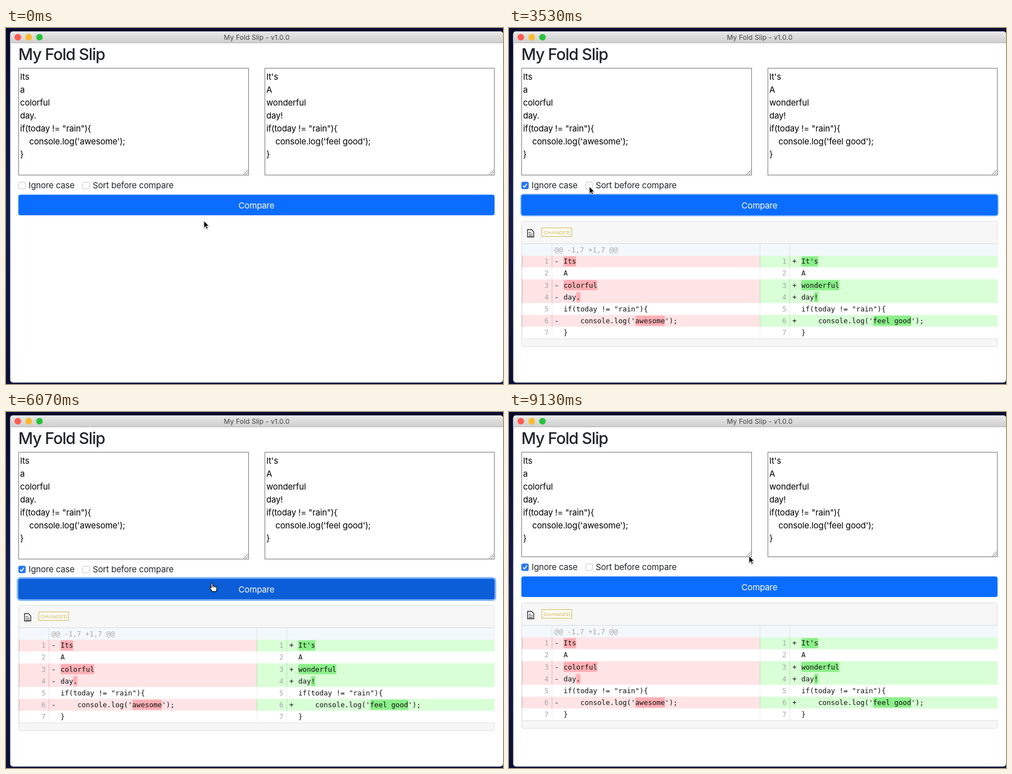
Recreate the animation shown at these times as an HTML page. Size 884 by 633 pixels, loop 9330 ms.

```html
<!DOCTYPE html>
<html lang="en">
<head>
<meta charset="utf-8">
<title>My Fold Slip</title>
<style>
  html, body { margin: 0; width: 100%; height: 100%; overflow: hidden; background: #0b1038; }
  svg { display: block; }
  text { font: 15px Inter, sans-serif; letter-spacing: -.01em; white-space: pre; fill: #212529; }
  .heading { font-size: 28.5px; font-weight: 500; letter-spacing: -.035em; }
  .caption { font-size: 12px; letter-spacing: .01em; fill: #444; text-anchor: middle; }
  .input { fill: #000; }
  .action { fill: #fff; text-anchor: middle; }
  .badge { font: 9.6px "Liberation Sans", sans-serif; letter-spacing: 0; fill: #d0b44c; }
  .code { font: 12.48px "DejaVu Sans Mono", monospace; letter-spacing: 0; fill: #111; }
  .dim { fill: #a3a6a8; }
  .number { text-anchor: end; }
</style>
</head>
<body>
<svg width="884" height="633" viewBox="0 0 884 633">
  <defs>
    <linearGradient id="desktop" x2="0" y2="1">
      <stop stop-color="#070a2c"/><stop offset=".5" stop-color="#121d50"/><stop offset="1" stop-color="#0b0f36"/>
    </linearGradient>
    <linearGradient id="titlebar" x2="0" y2="1">
      <stop stop-color="#e9e9e9"/><stop offset="1" stop-color="#cfcfcf"/>
    </linearGradient>
  </defs>
  <rect width="884" height="633" fill="url(#desktop)"/>
  <rect x="7.5" y="6" width="876.5" height="624.5" rx="5" fill="#fff"/>
  <path d="M7.5 26.5V11a5 5 0 0 1 5-5H879a5 5 0 0 1 5 5V26.5z" fill="url(#titlebar)"/>
  <path d="M7.5 26.5H884" stroke="#b4b4b4"/>
  <circle cx="21" cy="16.3" r="5.9" fill="#fc5b54"/>
  <circle cx="40.3" cy="16.3" r="5.9" fill="#fdb92d"/>
  <circle cx="59.5" cy="16.3" r="5.9" fill="#27c23c"/>
  <text class="caption" x="446" y="20.8">My Fold Slip - v1.0.0</text>
  <text class="heading" x="22" y="56.5">My Fold Slip</text>
  <g id="inputs"></g>
  <g id="lower">
    <g id="options"></g>
    <rect id="ring" fill="#82b5fb"/>
    <rect id="button" x="22" y="296.5" width="847" height="36.5" rx="3.8"/>
    <text class="action" x="445.5" y="320.5">Compare</text>
    <g id="diffs"></g>
  </g>
  <g id="cursor" style="filter: drop-shadow(0 1px 1px #0006)">
    <path id="arrow" d="M0 0V12.4L2.9 9.8 4.9 14.4 7 13.5 5 9H8.9z" fill="#000" stroke="#fff" stroke-width=".9"/>
    <path id="hand" d="M-1.3 1Q0-.8 1.3 1V5.4Q2.6 4.5 3.7 5.9 5.1 5.1 6.2 6.5 8.4 6 8.4 8V10.5Q8.3 13 7 15H.3Q-1 12.3-4 9.2-3.8 6.9-1.3 8.7z M1.3 5.4V8M3.7 6V8.2M6.2 6.6V8.6" fill="#fff" stroke="#111" stroke-width="1.05" stroke-linejoin="round"/>
  </g>
</svg>
<script>
const LOOP = 9330, FPS = 15;
const ROW = 21.1, ROWS_TOP = 404.7, CHAR = 12.48 * 0.602;
const $ = id => document.getElementById(id);
const escape = s => s.replace(/&/g, '&amp;').replace(/</g, '&lt;');
const rect = (x, y, w, h, attrs) => `<rect x="${x}" y="${y}" width="${w}" height="${h}" ${attrs}/>`;
const line = (d, color) => `<path d="${d}" fill="none" stroke="${color}"/>`;
const label = (x, y, cls, s) => `<text x="${x}" y="${y}" class="${cls}">${escape(s)}</text>`;

// Text areas and options
const areas = [
  [22.5, 409, ['Its', 'a', 'colorful', 'day.', 'if(today != "rain"){', "    console.log('awesome');", '}']],
  [460.5, 408, ["It's", 'A', 'wonderful', 'day!', 'if(today != "rain"){', "    console.log('feel good');", '}']],
];
$('inputs').innerHTML = areas.map(([x, w, lines]) =>
  rect(x, 71.5, w, 190, 'class="area" fill="#fff" stroke="#767676"') +
  lines.map((s, i) => label(x + 2.5, 91.5 + 23.04 * i, 'input', s)).join('')).join('');

const grip = right => line(`M${right - 9} 260.5l8-8m-4 8l4-4`, '#666');
const checkbox = (id, x, caption) =>
  rect(x + .5, 274, 12, 12, 'rx="2.5" fill="#fff" stroke="#c4c4c4"') +
  `<g id="${id}">${rect(x, 273.5, 13, 13, 'rx="3" fill="#2577f2"')}
   <path d="M${x + 3} 280.3l2.6 2.8 4.4-6" fill="none" stroke="#fff" stroke-width="1.7"/></g>` +
  label(x + 18.3, 285.3, '', caption);
$('options').innerHTML = areas.map(([x, w]) => grip(x + w)).join('') +
  checkbox('ignore', 22, 'Ignore case') + checkbox('sort', 136, 'Sort before compare');

// Diff tables: the first character is the row kind, [brackets] mark highlighted parts
const tones = {
  '-': ['#ffe4e6', '#e9b4b6', '#ffafb4'],
  '+': ['#d9ffd7', '#b4e2b4', '#8bef89'],
  ' ': ['#fff', '#eee'],
  '': ['#eeeeee', '#e2e2e2'],
};

function half(specs, x) {
  let number = 0;
  return specs.map((spec, i) => {
    const kind = spec.charAt(0), [fill, edge, mark] = tones[kind];
    const y = ROWS_TOP + ROW * i, base = y + 14.6, body = spec.slice(1);
    let out = rect(x, y, 423, ROW + .1, `fill="${fill}"`) +
      line(`M${x + .5} ${y}v${ROW}M${x + 53.5} ${y}v${ROW}`, edge);
    if (!kind) return out;
    const start = body.indexOf('['), length = body.indexOf(']') - start - 1;
    if (start >= 0) out += rect(x + 74 + start * CHAR, y + 1.4, length * CHAR, 18, `rx="2.5" fill="${mark}"`);
    return out + label(x + 47.5, base, 'code dim number', String(++number)) +
      label(x + 58, base, 'code', kind) + label(x + 74, base, 'code', body.replace(/[[\]]/g, ''));
  }).join('');
}

function diff([left, right]) {
  const end = ROWS_TOP + ROW * left.length;
  return `<g>${rect(22.5, 343.5, 846, end - 329.5, 'rx="3" fill="#f7f7f7" stroke="#dedede"')}
    <path d="M33 358.5h7l4 4v9h-11z" fill="#fff" stroke="#222" stroke-width="1.3"/>
    ${line('M35 363.5h4M35 366.5h7M35 369.5h7', '#222')}
    ${rect(58.5, 355.5, 53, 15, 'fill="#fff" stroke="#d0b44c"')}
    ${label(61.2, 366.6, 'badge', 'CHANGED')}
    ${rect(23, 384, 845.5, 20.8, 'fill="#f3f8fc"')}
    ${line('M76.5 384v20.7M446.5 384v20.7M499.5 384v20.7', '#d5e4ef')}
    ${line('M23 383.5H868', '#d8dcdf')}
    ${label(81, 398.5, 'code dim', '@@ -1,7 +1,7 @@')}
    ${half(left, 23)}${half(right, 446)}
    ${line(`M23 ${end + .5}H868`, '#dedede')}</g>`;
}

const test = ' if(today != "rain"){';
const logs = ["-    console.log('[awesome]');", "+    console.log('[feel good]');"];
const unsorted = (a, b) => [
  ['-[Its]', a, '-[colorful]', '-day[.]', test, logs[0], ' }'],
  ["+[It's]", b, '+[wonderful]', '+day[!]', test, logs[1], ' }'],
];
const sorted = [
  [logs[0], '-Its', ' A', '-[colorful]', '-day[.]', test, '', ' }'],
  [logs[1], '', ' A', "+[It's]", '+day[!]', test, '+wonderful', ' }'],
];
$('diffs').innerHTML = [unsorted('-[a]', '+[A]'), unsorted(' A', ' A'), sorted].map(diff).join('');

// Timeline, in ms
const pointer = [
  [0, 352, 343], [333, 338, 323], [1267, 338, 323], [1600, 127, 304], [1933, 32, 282], [2133, 32, 282],
  [2533, 270, 309], [3067, 270, 309], [3467, 143, 282], [3600, 143, 282], [3933, 319, 312], [4467, 319, 312],
  [4933, 146, 283], [5133, 146, 283], [5400, 332, 325], [5533, 336, 322], [5933, 336, 322], [6333, 427, 268],
  [6400, 427, 268], [6600, 427, 262], [7067, 427, 262], [7333, 427, 261], [7533, 427, 261], [7600, 427, 260],
  [7800, 427, 260], [8533, 427, 255], [9000, 427, 255], [9067, 427, 256],
];
const resize = [[0, 0], [7800, 0], [8533, -5], [9000, -5], [9067, -4]];
const presses = [[745, 930], [2610, 2860], [4145, 4390], [5675, 5925]];
const focuses = [[745, 2015], [2610, 3480], [4145, 5015], [5675, 7020]];
const results = [[925, 0], [2860, 1], [4390, 2], [5925, 1]];

function sample(keys, t) {
  const i = keys.findIndex(k => k[0] > t);
  if (i < 0) return keys.at(-1).slice(1);
  const a = keys[i - 1], b = keys[i], p = (t - a[0]) / (b[0] - a[0]);
  return a.slice(1).map((v, n) => v + (b[n + 1] - v) * p);
}
const within = spans => t => spans.some(([from, to]) => t >= from && t < to);
const hovered = t => {
  const y = sample(pointer, Math.max(0, t))[1];
  return y > 296.5 && y < 333;
};
// Share of the last 150 ms in which a state held, giving a linear transition
const eased = (state, t) => {
  let sum = 0;
  for (let k = 0; k < 15; k++) sum += state(t - k * 10);
  return sum / 15;
};
const mix = (a, b, p) => a.map((v, i) => v + (b[i] - v) * p);
const show = (el, on) => el.style.display = on ? '' : 'none';

function draw(now) {
  const t = Math.floor((now % LOOP + 4) * FPS / 1000) * 1000 / FPS;
  const [x, y] = sample(pointer, t), dy = Math.round(sample(resize, t)[0]);

  $('cursor').setAttribute('transform', `translate(${x} ${y})`);
  show($('hand'), hovered(t));
  show($('arrow'), !hovered(t));

  const hover = mix([11, 109, 255], [11, 94, 215], eased(hovered, t));
  const color = mix(hover, [4, 83, 200], eased(within(presses), t));
  $('button').setAttribute('fill', `rgb(${color.map(Math.round)})`);
  const spread = 3 * eased(within(focuses), t);
  const ring = { x: 22 - spread, y: 296.5 - spread, width: 847 + 2 * spread, height: 36.5 + 2 * spread, rx: 3.8 + spread };
  for (const key in ring) $('ring').setAttribute(key, ring[key]);

  show($('ignore'), t >= 2130);
  show($('sort'), t >= 3595 && t < 5130);
  const result = results.findLast(r => t >= r[0]);
  [...$('diffs').children].forEach((el, i) => show(el, result && result[1] === i));

  $('lower').setAttribute('transform', `translate(0 ${dy})`);
  document.querySelectorAll('.area').forEach(el => el.setAttribute('height', 190 + dy));
}

const start = performance.now();
(function tick() {
  draw(performance.now() - start);
  requestAnimationFrame(tick);
})();
</script>
</body>
</html>
```
